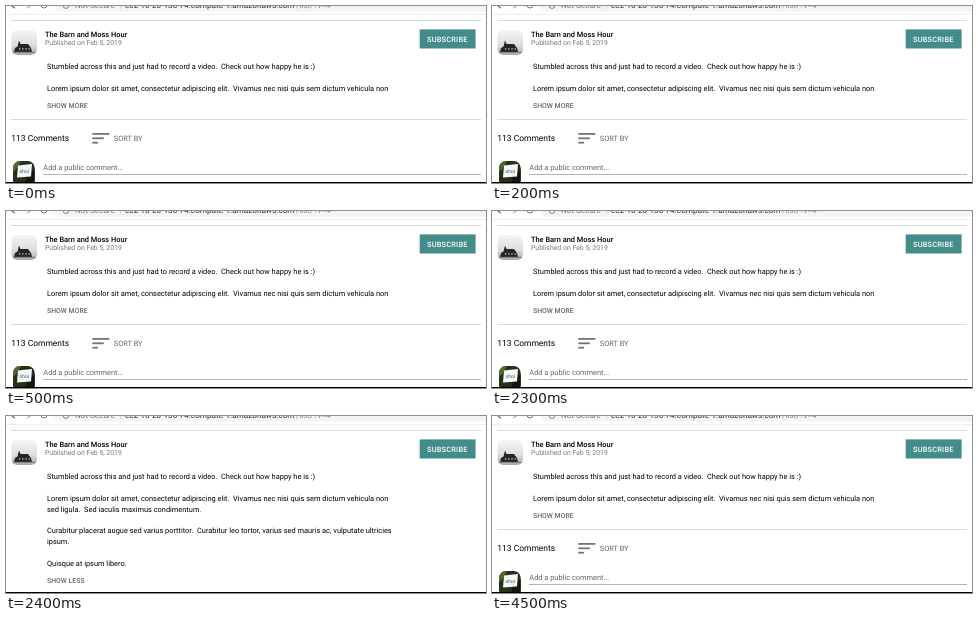
An HTML page with a canvas for the animation above (5500 ms loop, 480 px wide and 177 px high).

```html
<!DOCTYPE html>
<html lang="en">
<head>
<meta charset="utf-8">
<title>Show more / show less</title>
<style>
  html, body { margin: 0; width: 100%; height: 100%; overflow: hidden; background: #fff; }
  canvas { display: block; width: 480px; height: 177px; }
</style>
</head>
<body>
<canvas id="stage"></canvas>
<script>
const W = 480, H = 177, LOOP = 5500, OPEN_AT = 2400, CLOSE_AT = 4500;
const BODY = 7.41, SMALL = 6.9, LINE = 10.95;
const INK = '#000', GREY = '#666', RULE = '#dadada', TEAL = '#438c8a';

const intro = [
  'Stumbled across this and just had to record a video.  Check out how happy he is :)',
  '',
  'Lorem ipsum dolor sit amet, consectetur adipiscing elit.  Vivamus nec nisi quis sem dictum vehicula non'
];
const rest = [
  'sed ligula.  Sed iaculis maximus condimentum.',
  '',
  'Curabitur placerat augue sed varius porttitor.  Curabitur leo tortor, varius sed mauris ac, vulputate ultricies',
  'ipsum.',
  '',
  'Quisque at ipsum libero.'
];

const canvas = document.getElementById('stage');
const ctx = canvas.getContext('2d');
const dpr = window.devicePixelRatio || 1;
canvas.width = W * dpr;
canvas.height = H * dpr;
ctx.scale(dpr, dpr);
ctx.textRendering = 'geometricPrecision';

function rect(x, y, w, h, color) {
  ctx.fillStyle = color;
  ctx.fillRect(x, y, w, h);
}

function text(str, x, y, size = BODY, color = INK, weight = 400, spacing = 0) {
  ctx.font = `${weight} ${size}px Roboto, sans-serif`;
  ctx.letterSpacing = spacing + 'px';
  ctx.fillStyle = color;
  ctx.fillText(str, x, y);
}

function lines(list, y) {
  list.forEach((str, i) => text(str, 41, y + i * LINE));
}

function shape(color, points) {
  ctx.fillStyle = color;
  ctx.beginPath();
  points.forEach(([x, y]) => ctx.lineTo(x, y));
  ctx.fill();
}

function ring(x, y, r, color) {
  ctx.strokeStyle = color;
  ctx.lineWidth = 0.9;
  ctx.beginPath();
  ctx.arc(x, y, r, 0, Math.PI * 2);
  ctx.stroke();
}

function rounded(x, y, w, h, r, paint) {
  ctx.save();
  ctx.beginPath();
  ctx.roundRect(x, y, w, h, r);
  ctx.clip();
  paint();
  ctx.restore();
}

function addressBar() {
  rounded(48, -10, 460, 15.5, 7, () => rect(48, -10, 460, 16, '#f3f4f5'));
  rect(0, 8, W, 1, '#eee');
  shape('#666', [[5, 0], [7, 0], [9.5, 2], [8.5, 2.6]]);
  shape('#aaa', [[23, 0], [25, 0], [21.5, 2.6], [20.5, 2]]);
  ring(38, -1, 3, '#666');
  ring(60, -0.6, 3, '#777');
  text('Not Secure', 69, 2.1, 8.1, '#777');
  rect(114, 0, 0.6, 3, '#bbb');
  text('ec2-10-20-130-74.compute-1.amazonaws.com', 119, 2.1, 8.2, '#333');
  text('/list/?v=4', 290, 2.1, 8.2, '#888');
}

function channelPicture() {
  rounded(5.5, 24, 25.5, 25, 6, () => {
    const sky = ctx.createLinearGradient(0, 24, 0, 49);
    sky.addColorStop(0, '#f4f4f4');
    sky.addColorStop(0.6, '#dedede');
    sky.addColorStop(0.8, '#c4c4c4');
    sky.addColorStop(1, '#a8a8a8');
    rect(5, 24, 26, 25, sky);
    shape('#252525', [[8, 46], [9, 42], [11.5, 40.5], [13, 34.5], [14.5, 38], [22, 38], [25, 42], [26, 46]]);
    for (let x = 13; x < 24; x += 3.2) rect(x, 42, 1.2, 1.8, '#aaa');
    rect(5, 45.8, 26, 1, '#777');
  });
}

function viewerPicture() {
  rounded(7, 155, 21.7, 26, 7, () => {
    rect(7, 155, 22, 26, '#25301a');
    shape('#53682f', [[7, 155], [15, 155], [11, 162], [7, 166]]);
    shape('#12170d', [[21, 170], [29, 163], [29, 177], [19, 177]]);
    shape('#f6f7f8', [[12, 159.5], [26, 158], [25, 170.5], [11, 171.5]]);
    text('ohoi', 13.5, 166.5, 5, '#555');
  });
}

function header() {
  rect(5, 14, 470, 1, RULE);
  channelPicture();
  text('The Barn and Moss Hour', 39, 31.2, BODY, INK, 500);
  text('Published on Feb 5, 2019', 39, 39.2, SMALL, '#777');
  rect(413.7, 23.4, 55.9, 19.1, TEAL);
  text('SUBSCRIBE', 421, 35.7, BODY, '#fff', 500, 0.2);
}

function comments() {
  rect(5, 113, 470, 1, RULE);
  text('113 Comments', 5.3, 135, 8.48);
  [17, 11.5, 5.7].forEach((w, i) => rect(86.3, 127 + i * 4.4, w, 1.8, '#757575'));
  text('SORT BY', 107.8, 135.2, BODY, GREY);
  viewerPicture();
  text('Add a public comment...', 37.3, 164.1, BODY, GREY);
  rect(37, 168, 438, 0.9, '#ababab');
}

function draw(t) {
  rect(0, 0, W, H, '#fff');
  addressBar();
  header();
  lines(intro, 62.7);
  if (t >= OPEN_AT && t < CLOSE_AT) {
    lines(rest, 62.7 + intro.length * LINE);
    text('SHOW LESS', 41, 167, SMALL, GREY, 500);
  } else {
    text('SHOW MORE', 41, 102.4, SMALL, GREY, 500);
    comments();
  }
  rect(0, 176, W, 1, '#000');
}

const start = performance.now();
function tick() {
  draw((performance.now() - start) % LOOP);
  requestAnimationFrame(tick);
}
tick();
</script>
</body>
</html>
```
